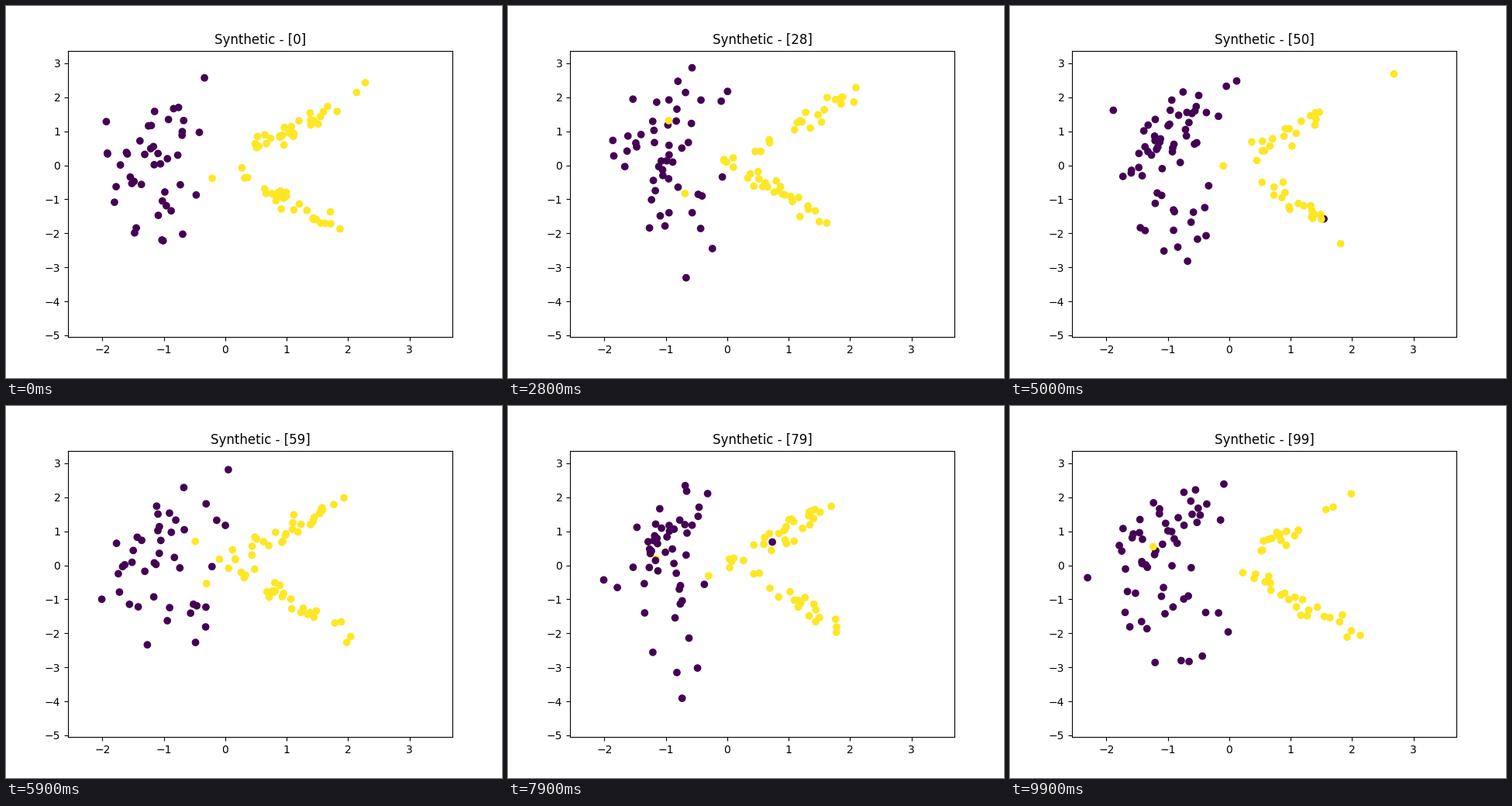
A matplotlib script for the animation above (10 s loop, 640 by 480 pixels).

```python
import numpy as np
import matplotlib.pyplot as plt
from matplotlib.animation import FuncAnimation

FRAMES = 100
INTERVAL = 100
POINTS = 100
FLIP = 0.012


def sample(i):
    """Draw a fresh batch: four slanted blobs on the corners of a square."""
    rng = np.random.default_rng([7, i])
    corner = rng.integers(4, size=POINTS)
    label = corner // 2
    cx = 2 * label - 1
    cy = 2 * (corner % 2) - 1

    # The right blobs are thin diagonals, the left ones loose clouds
    right = label == 1
    spread = np.where(right, 0.57, 0.46)
    noise = np.where(right, 0.17, 0.72 - 0.17 * cy)

    u, v = rng.standard_normal((2, POINTS))
    x = cx + spread * u
    y = cy + cy * (x - cx) + noise * v
    flipped = rng.random(POINTS) < FLIP
    return np.column_stack([x, y]), np.where(flipped, 1 - label, label)


fig, ax = plt.subplots(figsize=(6.4, 4.8), dpi=100)
xy, label = sample(0)
dots = ax.scatter(*xy.T, c=label, cmap="viridis", vmin=0, vmax=1)
title = ax.set_title("Synthetic - [0]")
ax.set_xlim(-2.56, 3.698)
ax.set_ylim(-5.052, 3.372)


def update(i):
    xy, label = sample(i)
    dots.set_offsets(xy)
    dots.set_array(label)
    title.set_text(f"Synthetic - [{i}]")
    return dots, title


anim = FuncAnimation(fig, update, frames=FRAMES, interval=INTERVAL,
                     repeat=True, repeat_delay=0, blit=False)
plt.show()
```
